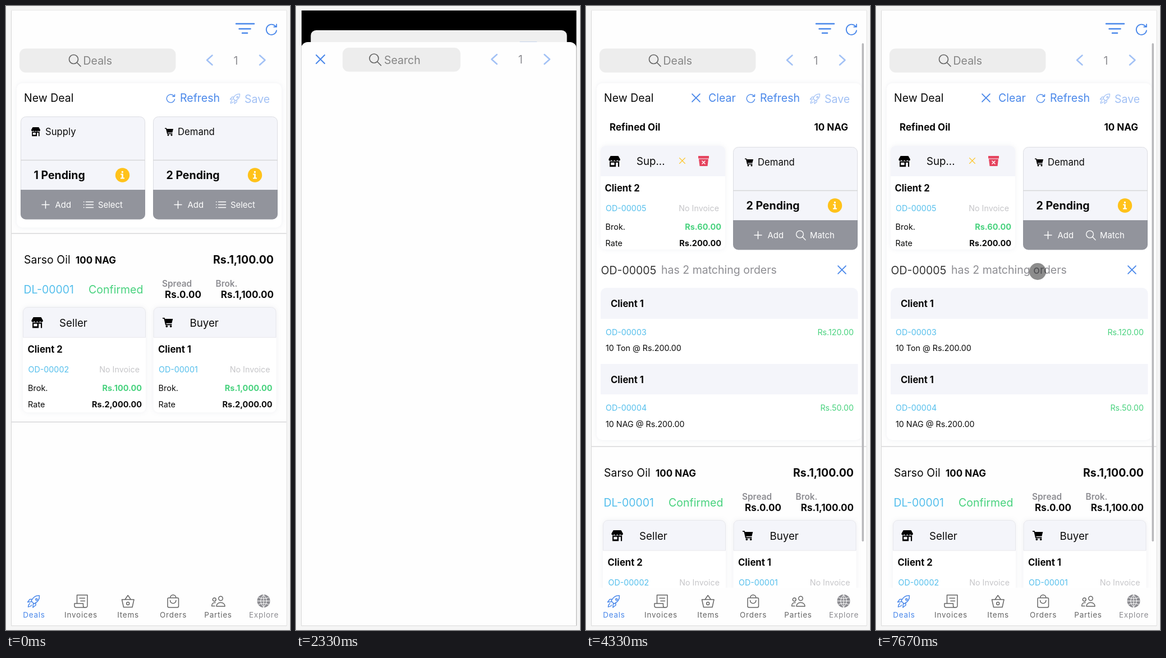
Recreate the animation shown at these times as an HTML page. Size 506x1107 px, loop 8000 ms.

```html
<!DOCTYPE html>
<html lang="en">
<head>
<meta charset="utf-8">
<title>Deals app</title>
<style>
  html, body { margin: 0; width: 100%; height: 100%; overflow: hidden; background: #f5f5f5; }
  svg { display: block; }
  text { font: 400 19.5px Inter, "Open Sans", sans-serif; fill: #0a0a0a; }
  .t17 { font-size: 16.7px; }
  .t15 { font-size: 14.9px; }
  .t14 { font-size: 14.3px; }
  .title { font-size: 18.7px; }
  .b { font-weight: 700; }
  .amt { font-size: 17px; }
  .sub { font-size: 14.5px; }
  .end { text-anchor: end; }
  .mid { text-anchor: middle; }
  .blue { color: #4a88ea; fill: #4a88ea; }
  .pale { color: #a2c1f5; fill: #a2c1f5; }
  .cyan { fill: #55bfec; }
  .green { fill: #48d27e; }
  .grey { color: #8d8d92; fill: #8d8d92; }
  .faint { fill: #c6c6c9; }
  .hint { fill: #858585; }
  .white, .white text { color: #fff; fill: #fff; }
  .dark { color: #666; fill: #666; }
  .gold { color: #ffc21a; }
  .line { fill: none; stroke: currentColor; stroke-width: 2; stroke-linecap: round; stroke-linejoin: round; }
  .thin { stroke-width: 1.5; }
  .thick { stroke-width: 2.5; }
  .rule { stroke: #d6d6d8; stroke-width: 1.3; }
  .panel { fill: #f4f5fa; }
  .card { fill: #fff; filter: drop-shadow(0 0 4px rgba(70, 75, 120, .08)); }
  .label { font-size: 15.4px; font-weight: 600; }
  .tabs text { font-size: 13.5px; letter-spacing: .75px; text-anchor: middle; fill: inherit; }
</style>
</head>
<body>
<svg width="506" height="1107" viewBox="0 0 506 1107">
  <defs>
    <clipPath id="stage"><rect x="10" y="8" width="489.5" height="1091"/></clipPath>
    <clipPath id="pageClip"><rect id="pageShape" x="9" y="8" width="491" height="1091.5"/></clipPath>

    <path id="store" fill-rule="evenodd" d="M2.6 0h10.8L16 4.8a2 2 0 0 1-4 .9 2 2 0 0 1-4 0 2 2 0 0 1-4 0A2 2 0 0 1 0 4.8zM1.3 8h13.4v8H1.3zM3 9.7v3.8h5V9.7zM10 9.7V16h3V9.7z"/>
    <path id="cart" d="M0 .4h2.9l.6 1.7H15L13.4 8.4H5.2l.3 1.3h7.9v1.5H4.2L2 1.9H0zM6 11.4a1.5 1.5 0 1 0 .01 0zM12 11.4a1.5 1.5 0 1 0 .01 0z"/>
    <path id="refresh" class="line" style="stroke-width:1.8" d="M9 2.5A9.2 9.2 0 1 1 5.500-6.500L8.500-4M9-8.500v4.700H4.300"/>
    <path id="lens" class="line" style="stroke-width:1.7" d="M8 0A8 8 0 1 1-8 0 8 8 0 1 1 8 0M6 6l6.5 6.5"/>
    <path id="prev" class="line thick" d="M5-8.5L-4.5 0 5 8.5"/>
    <path id="cross" class="line" d="M-7.5-7.5l15 15m0-15l-15 15"/>
    <path id="plus" class="line thin" d="M-6.5 0h13M0-6.5v13"/>
    <path id="list" class="line thin" d="M-4-5H9M-4 0H9M-4 5H9M-8-5h.5M-8 0h.5M-8 5h.5"/>
    <path id="rocket" class="line thin" d="M22 2C16 1.5 11 4 7.5 11.5l5 5C20 13 22.5 8 22 2zM9 8.5H5L1 13.5l6.5-.5M15.5 15v4l-5 4 .5-6.5M5 16c-2 1-2.5 3-3 6 3-.5 5-1 6-3M15.2 8.8a1.6 1.6 0 1 0 3.2 0 1.6 1.6 0 1 0-3.2 0"/>
    <g id="info">
      <circle r="12.7" fill="#ffc21a"/>
      <path fill="#fff" d="M-3.3-2.5H1.3V4.5H3.5V6.5H-3.5V4.5H-1.3V-.5h-2zM-.1-7.2a1.7 1.7 0 1 1-.01 0z"/>
    </g>

    <!-- Pending orders card, shared by supply and demand -->
    <g id="pending">
      <rect class="panel" x="26.5" y="196.5" width="221" height="181.5" rx="9" stroke="#dcdde2"/>
      <path class="rule" d="M26 273.5h222" stroke="#e1e2e6"/>
      <path fill="#92949c" d="M26 326h222v43.5a9 9 0 0 1-9 9H35a9 9 0 0 1-9-9z"/>
      <use href="#info" x="207.5" y="300"/>
      <g class="white">
        <use href="#plus" x="70.5" y="352.5"/>
        <text class="t15" x="87.5" y="358">Add</text>
      </g>
    </g>
    <g id="select" class="white">
      <use href="#list" x="146.5" y="352.5"/>
      <text class="t15" x="164" y="358">Select</text>
    </g>
    <g id="demand">
      <use href="#pending"/>
      <use href="#cart" x="47" y="216"/>
      <text class="t17" x="70" y="229">Demand</text>
      <text class="b" x="49.5" y="307">2 Pending</text>
    </g>

    <g id="party">
      <rect class="card" x="30" y="534" width="219" height="187" rx="9"/>
      <path class="panel" d="M30.5 588v-45a8.5 8.5 0 0 1 8.5-8.5h201a8.5 8.5 0 0 1 8.5 8.5v45z" stroke="#e2e3e8" stroke-width=".8"/>
      <text class="t14 faint end" x="238" y="650">No Invoice</text>
      <text class="sub" x="39" y="683">Brok.</text>
      <text class="sub" x="39" y="711.5">Rate</text>
      <text class="sub b end" x="242" y="711.5">Rs.2,000.00</text>
    </g>
    <g id="deal">
      <path class="rule" d="M9 403.5h491"/>
      <text x="32" y="457">Sarso Oil</text>
      <text class="amt b" x="124" y="457">100 NAG</text>
      <text class="b end" x="477" y="457">Rs.1,100.00</text>
      <text class="cyan" x="31.5" y="509.5">DL-00001</text>
      <text class="green" x="147" y="509.5">Confirmed</text>
      <text class="grey label" x="278" y="498">Spread</text>
      <text class="grey label" x="373.5" y="498">Brok.</text>
      <text class="amt b end" x="348" y="518">Rs.0.00</text>
      <text class="amt b end" x="477" y="518">Rs.1,100.00</text>
      <use href="#party"/>
      <use href="#store" transform="translate(45.5 552) scale(1.27 1.2)"/>
      <text class="title" x="95" y="568.5">Seller</text>
      <text class="t17 b" x="38.5" y="614.5">Client 2</text>
      <text class="t14 cyan" x="39.5" y="650">OD-00002</text>
      <text class="sub b green end" x="242" y="683">Rs.100.00</text>
      <g transform="translate(232.5 0)">
        <use href="#party"/>
        <use href="#cart" transform="translate(46.5 552.5) scale(1.22)"/>
        <text class="title" x="95" y="568.5">Buyer</text>
        <text class="t17 b" x="38.5" y="614.5">Client 1</text>
        <text class="t14 cyan" x="39.5" y="650">OD-00001</text>
        <text class="sub b green end" x="242" y="683">Rs.1,000.00</text>
      </g>
      <path class="rule" d="M9 738h491"/>
    </g>
  </defs>

  <path d="M9.5 8v1091.500h490.500V8z" fill="#fff" stroke="#d9d9d9"/>
  <g clip-path="url(#stage)">
    <rect id="backdrop" x="9" y="8" width="491" height="1092" fill="#000"/>

    <g id="page" clip-path="url(#pageClip)">
      <rect x="9" y="8" width="491" height="1092" fill="#fefefe"/>
      <g class="blue">
        <path class="line thick" d="M410 31.5h32M415.5 40.5h20M421 48h9"/>
        <use href="#refresh" x="473" y="41"/>
      </g>
      <rect x="24" y="75.5" width="278.5" height="42.5" rx="11" fill="#ededed"/>
      <use href="#lens" class="dark" x="120.5" y="94.5"/>
      <text class="hint" x="137.5" y="104">Deals</text>
      <use href="#prev" class="pale" x="362.5" y="96"/>
      <text class="grey mid" x="409.5" y="104">1</text>
      <use href="#prev" class="pale" transform="translate(457 96) scale(-1 1)"/>

      <rect id="dealCard" class="card" x="19" y="137" width="472" height="256" rx="10"/>
      <text x="32" y="169.5">New Deal</text>
      <use href="#refresh" class="blue" transform="translate(293.5 163.5) scale(.78)"/>
      <text class="blue" x="310" y="170">Refresh</text>
      <use href="#rocket" class="pale" transform="translate(398.5 154.5) scale(.82)"/>
      <text class="pale" x="425" y="171.5">Save</text>

      <g id="before">
        <use href="#pending"/>
        <use href="#store" x="45" y="215"/>
        <text class="t17" x="70" y="229">Supply</text>
        <text class="b" x="49.5" y="307">1 Pending</text>
        <rect id="pressed" x="135.5" y="338" width="80.5" height="29" rx="6" opacity=".13"/>
        <use href="#select"/>
        <use href="#demand" x="236"/>
        <use href="#select" x="236"/>
        <use href="#deal"/>
      </g>

      <g id="after">
        <use href="#cross" class="blue" transform="translate(196 163) scale(.92)"/>
        <text class="blue" x="218" y="170">Clear</text>
        <text class="amt b" x="42" y="221">Refined Oil</text>
        <text class="amt b end" x="467" y="221">10 NAG</text>

        <rect class="card" x="26" y="248" width="222" height="184" rx="9"/>
        <path class="panel" d="M26 302v-45a9 9 0 0 1 9-9h204a9 9 0 0 1 9 9v45z"/>
        <use href="#store" transform="translate(40.5 266) scale(1.27 1.2)"/>
        <text class="title" x="90" y="282">Sup...</text>
        <use href="#cross" class="gold" transform="translate(171.5 274.5) scale(.65)"/>
        <path fill="#e5445f" d="M200 266h19v4.5h-19zM201 271.5h17l-1.5 12.5h-14z"/>
        <path class="line thin white" style="fill:none" d="M207 275l5 5m0-5l-5 5"/>
        <text class="t17 b" x="33.5" y="328.5">Client 2</text>
        <text class="t14 cyan" x="35" y="363.5">OD-00005</text>
        <text class="t14 faint end" x="237" y="363.5">No Invoice</text>
        <text class="sub" x="34.5" y="397">Brok.</text>
        <text class="sub b green end" x="241" y="397">Rs.60.00</text>
        <text class="sub" x="34.5" y="425.5">Rate</text>
        <text class="sub b end" x="241" y="425.5">Rs.200.00</text>

        <g transform="translate(236 54)">
          <use href="#demand"/>
          <g class="white">
            <use href="#lens" transform="translate(145 351) scale(.8)"/>
            <text class="t15" x="163" y="358">Match</text>
          </g>
        </g>

        <text x="26.5" y="475.5" style="fill:#333">OD-00005</text>
        <text class="grey" x="134" y="475">has 2 matching orders</text>
        <use href="#cross" class="blue" transform="translate(456 468) scale(.92)"/>
        <path class="panel" d="M26 555v-45a10 10 0 0 1 10-10h438.5a10 10 0 0 1 10 10v45zM26 635h458.5v54H26z"/>
        <text class="t17 b" x="44" y="534">Client 1</text>
        <text class="t14 cyan" x="35" y="583.5">OD-00003</text>
        <text class="t14 green end" x="477" y="583.5">Rs.120.00</text>
        <text class="t14" x="35" y="612">10 Ton @ Rs.200.00</text>
        <text class="t17 b" x="44" y="669">Client 1</text>
        <text class="t14 cyan" x="35" y="718">OD-00004</text>
        <text class="t14 green end" x="477" y="718">Rs.50.00</text>
        <text class="t14" x="35" y="747">10 NAG @ Rs.200.00</text>
        <use href="#deal" y="378"/>
        <rect x="491.5" y="66" width="3.5" height="884" rx="1.7" fill="#b8b8bb"/>
      </g>

      <rect x="9" y="1032" width="491" height="68" fill="#fefefe"/>
      <g class="tabs">
        <g class="blue">
          <use href="#rocket" x="37.5" y="1044"/>
          <text x="50" y="1084.5">Deals</text>
        </g>
        <g class="dark">
          <path class="line thin" d="M126.5 1060v-15h18.5v18.5a3 3 0 0 1-3 3.5h-17a3 3 0 0 1-3-3v-4h15.5v4a3 3 0 0 0 4 3M131 1050.5h9.5M133 1055.5h7.5"/>
          <text x="133.5" y="1084.5">Invoices</text>
          <path class="line thin" d="M206.5 1053h21.5l-3 13.5h-15.5zM212 1053l5.2-7.5 5.2 7.5M214.7 1060a2.5 2.5 0 1 0 5 0 2.5 2.5 0 1 0-5 0"/>
          <text x="217.5" y="1084.5">Items</text>
          <path class="line thin" d="M290 1050h15.5q2 0 2 2v12.5q0 2.5-2.5 2.5h-14.5q-2.5 0-2.5-2.5V1052q0-2 2-2zM292.5 1050a5.2 5.2 0 0 1 10.4 0M292.5 1054.500a5.2 5.2 0 0 0 10.4 0"/>
          <text x="298" y="1084.5">Orders</text>
          <path class="line thin" d="M378.8 1051a3.7 3.7 0 1 0 7.4 0 3.7 3.7 0 1 0-7.4 0M375 1065c.5-9 14.5-9 15 0zM368.3 1053a2.9 2.9 0 1 0 5.8 0 2.9 2.9 0 1 0-5.8 0M373 1058.5c-4-.5-6.5 2-6.5 6h5.5"/>
          <text x="378" y="1084.5">Parties</text>
        </g>
        <g class="grey">
          <circle cx="459" cy="1055.5" r="11.5"/>
          <path fill="none" stroke="#fff" d="M459 1044v23M447.5 1055.5h23M450 1049.5q9 3.5 18 0M450 1061.5q9-3.5 18 0M459 1044.5q-11 11 0 22M459 1044.5q11 11 0 22"/>
          <text x="459.5" y="1084.5">Explore</text>
        </g>
      </g>
      <rect id="dim" x="9" y="8" width="491" height="1092"/>
    </g>

    <g id="modal">
      <path fill="#fefefe" d="M9 1100V68a12 12 0 0 1 12-12h467a12 12 0 0 1 12 12v1032z"/>
      <use href="#cross" class="blue" x="43.5" y="86.5"/>
      <rect x="83" y="66" width="210" height="42.5" rx="11" fill="#ededed"/>
      <use href="#lens" class="dark" x="139" y="85"/>
      <text class="hint" x="157" y="94.5">Search</text>
      <use href="#prev" class="pale" x="353" y="86.5"/>
      <text class="grey mid" x="400" y="94">1</text>
      <use href="#prev" class="pale" transform="translate(447.5 86.5) scale(-1 1)"/>
      <g id="orders">
        <rect class="card" x="19" y="136" width="472" height="256" rx="10"/>
        <use href="#store" class="grey" transform="translate(33.5 153.5) scale(1.27 1.18)"/>
        <text x="64" y="170">Client 2</text>
        <text class="label b end" x="388.5" y="170">Brok.</text>
        <text class="end" x="477" y="170">Rs.60.00</text>
        <text class="cyan" x="32" y="221.5" style="font-size:17.3px">OD-00005</text>
        <text class="t17" x="161" y="211">Sell 10 NAG of Refined Oil at</text>
        <text class="t17" x="161" y="232">Rs.200.00 per NAG</text>
        <text class="t17" x="428" y="221.5" style="fill:#efadb5">Pending</text>
        <path class="rule" d="M9 251.5h491"/>
      </g>
      <path d="M9 1098.5h491" stroke="#8c8c8c"/>
    </g>
  </g>

  <g id="cursor">
    <circle r="15" opacity=".45"/>
    <circle id="ring" fill="none" stroke-width="2.2"/>
  </g>
</svg>

<script>
  const LOOP = 8000, STEPS = 24;
  const el = id => document.getElementById(id);
  const show = (id, on) => { el(id).style.display = on ? '' : 'none'; };
  const startOf = step => Math.round(step * 100 / 3) * 10;

  // Pointer position by step; absent steps hide it.
  const pointer = {
    2: [323, 264], 3: [196, 366], 4: [178.5, 366.5], 5: [178.5, 366.5], 6: [178.5, 366.5],
    9: [316, 230.5], 10: [316, 230.5], 11: [316, 230.5],
    16: [413, 446], 17: [144, 479], 18: [38, 619], 19: [360, 743],
    20: [448, 483], 21: [109, 562], 22: [352, 682], 23: [288, 471]
  };
  const black = '#000', light = '#f0f0f0';
  const rings = { 4: [17, black], 5: [17, light], 6: [17, light], 10: [33.5, black], 11: [16.5, light] };
  const modalDrop = { 7: 8, 8: 0, 9: 0, 10: 0, 11: 924 };

  function render(step) {
    const drop = modalDrop[step], open = drop !== undefined;
    const scale = !open ? 1 : step === 11 ? 0.987 : 0.93;
    show('backdrop', open);
    show('modal', open);
    show('orders', step >= 9);
    el('modal').setAttribute('transform', `translate(0 ${drop || 0})`);
    el('page').setAttribute('transform',
      `translate(254.5 508) scale(${scale}) translate(-254.5 -508)`);
    el('pageShape').setAttribute('rx', (1 - scale) * 150);
    el('dim').setAttribute('opacity', 12 * (1 - scale) ** 2);

    const matched = step >= 13;
    show('before', !matched);
    show('after', matched);
    show('pressed', step === 6);
    el('dealCard').setAttribute('height', matched ? 633 : 256);

    const at = pointer[step], ring = rings[step];
    show('cursor', at);
    show('ring', ring);
    if (at) el('cursor').setAttribute('transform', `translate(${at})`);
    if (ring) {
      el('ring').setAttribute('r', ring[0]);
      el('ring').setAttribute('stroke', ring[1]);
    }
  }

  let shown = -1;
  function tick(now) {
    const t = now % LOOP;
    let step = 0;
    while (step < STEPS - 1 && startOf(step + 1) <= t) step++;
    if (step !== shown) render(shown = step);
    requestAnimationFrame(tick);
  }
  render(0);
  requestAnimationFrame(tick);
</script>
</body>
</html>
```
